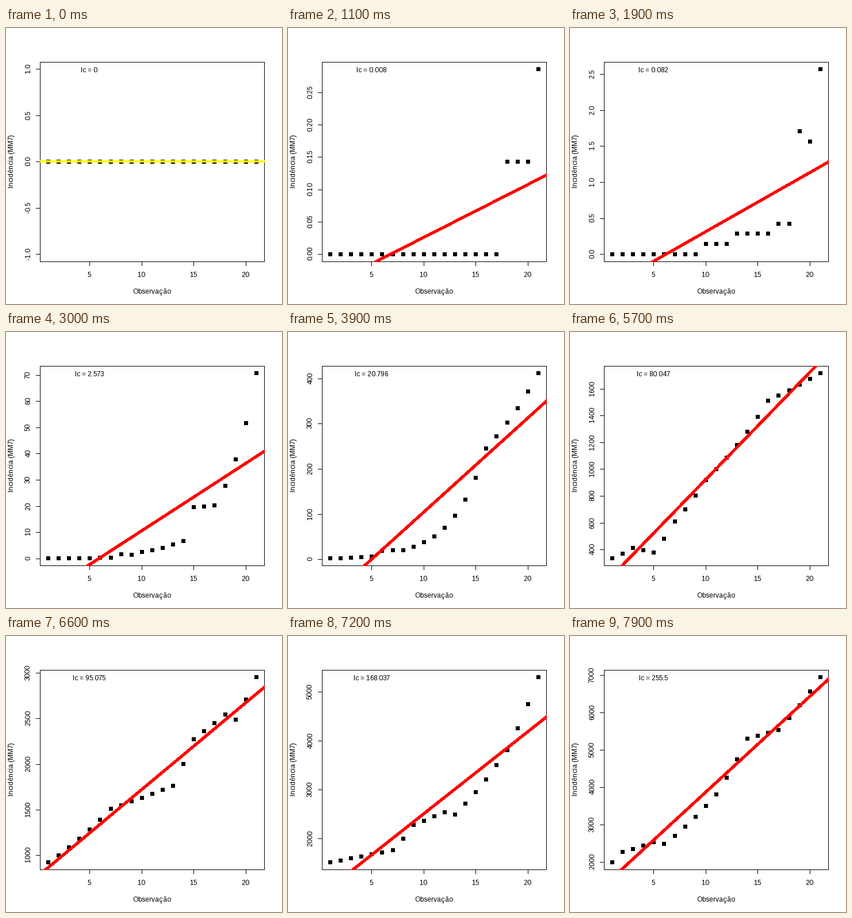
Recreate the animation shown at these times as a matplotlib script. Size 480 by 480 pixels, loop 8000 ms.

```python
import matplotlib.pyplot as plt
import numpy as np
from matplotlib.animation import FuncAnimation
from matplotlib.patches import PathPatch, Rectangle
from matplotlib.path import Path

SIZE, DPI = 480, 80
PT = 72 / DPI  # points per pixel
WINDOW, FRAMES, STEP_MS = 21, 80, 100
LEFT, RIGHT, TOP, BOTTOM = 59.04, 449.76, 59.04, 406.56
MAX_TICKS = 12

# Weekly cases at the turning points; growth is exponential in between
TURNS = {28: 1, 36: 3, 37: 12, 38: 11, 39: 18, 43: 48, 44: 138, 46: 142,
         54: 1724, 59: 2883, 61: 2655, 63: 4282, 66: 6456, 72: 10582,
         78: 12333, 80: 15931, 83: 17817, 84: 17437, 89: 26703, 92: 37151,
         95: 38726, 99: 48586}
calendar = np.arange(FRAMES + WINDOW - 1)
growth = np.exp(np.interp(calendar, list(TURNS), np.log(list(TURNS.values()))))
incidence = np.where(calendar < min(TURNS), 0, np.round(growth)) / 7
days = np.arange(1, WINDOW + 1)

# Dot outline: a seven-pixel square with cut corners
OCTAGON = np.array([(3.5, 2), (2, 3.5), (-2, 3.5), (-3.5, 2),
                    (-3.5, -2), (-2, -3.5), (2, -3.5), (3.5, -2), (3.5, 2)])

plt.rcParams.update({
    "font.family": "Liberation Sans",
    "font.size": 12 * PT,
    "text.hinting": "force_autohint",
    "text.hinting_factor": 1,
    "lines.antialiased": False,
    "patch.antialiased": False,
    "path.snap": False,
})

fig = plt.figure(figsize=(SIZE / DPI, SIZE / DPI), dpi=DPI, facecolor="white")
ax = fig.add_axes([0, 0, 1, 1])
ax.set(xlim=(0, SIZE), ylim=(SIZE, 0))
ax.axis("off")


def pixel(value):
    """Centre of the pixel that holds a coordinate."""
    return np.floor(value) + 0.5


def x_pos(x):
    return LEFT + (x - 0.2) / 21.6 * (RIGHT - LEFT)


def label(x, y, text="", rotation=0):
    return ax.text(x, y, text, ha="center", va="baseline",
                   rotation=rotation, rotation_mode="anchor")


def segment(xs, ys):
    return ax.plot(xs, ys, color="black", lw=PT, solid_capstyle="butt")[0]


def dots_path(xs, ys):
    centers = np.column_stack([xs, ys])
    return Path.make_compound_path_from_polys(centers[:, None] + OCTAGON)


def tick_unit(span):
    """Round step giving about five intervals."""
    cell = span / 5
    base = unit = 10.0 ** np.floor(np.log10(cell))
    for factor, bias in ((2, 0.8), (5, 1.7), (10, 0.8)):
        if factor * base - cell >= bias * (cell - unit):
            break
        unit = factor * base
    return unit


ax.add_patch(Rectangle((pixel(LEFT), pixel(TOP)), 390, 347, fill=False,
                       ec="black", lw=PT, joinstyle="miter"))
for day in (5, 10, 15, 20):
    x = pixel(x_pos(day))
    segment([x, x], [407, 414])
    label(x - 1, 433, str(day))
label(254, 462, "Observação")
label(13, 232, "Incidência (MM7)", 90)
slope_text = label(145, 77)

dots = ax.add_patch(PathPatch(dots_path(days, days), fc="black", lw=0,
                              zorder=2))
trend, = ax.plot([], [], lw=4 * PT, solid_capstyle="butt", zorder=3)
trend.set_clip_path(Rectangle((59, 59), 391, 348, transform=ax.transData))
y_ticks = [(segment([], []), label(42, 0, rotation=90))
           for _ in range(MAX_TICKS)]


def draw(frame):
    values = incidence[frame:frame + WINDOW]
    low, high = values.min(), values.max()
    if low == high:
        low, high = low - 1, high + 1
    margin = 0.04 * (high - low)
    low, high = low - margin, high + margin

    def y_pos(y):
        return BOTTOM - (y - low) / (high - low) * (BOTTOM - TOP)

    slope = ((days - 11) * values).sum() / 770
    ends = np.array([0, 22])
    dots.set_path(dots_path(pixel(x_pos(days)), pixel(y_pos(values))))
    trend.set_data(np.floor(x_pos(ends)),
                   np.floor(y_pos(values.mean() + slope * (ends - 11))))
    trend.set_color("red" if slope > 0 else "yellow")
    slope_text.set_text(f"Ic = {round(slope, 3):g}")

    unit = tick_unit(high - low)
    decimals = max(0, -int(np.floor(np.log10(unit) + 1e-9)))
    first = int(np.ceil(low / unit))
    for i, (mark, text) in enumerate(y_ticks):
        value = (first + i) * unit
        shown = value <= high
        mark.set_visible(shown)
        text.set_visible(shown)
        if shown:
            y = pixel(y_pos(value))
            mark.set_data([52, 59], [y, y])
            text.set_y(y - 1)
            text.set_text(f"{value:.{decimals}f}")
    return []


anim = FuncAnimation(fig, draw, frames=FRAMES, interval=STEP_MS,
                     repeat=True, repeat_delay=0)
plt.show()
```
